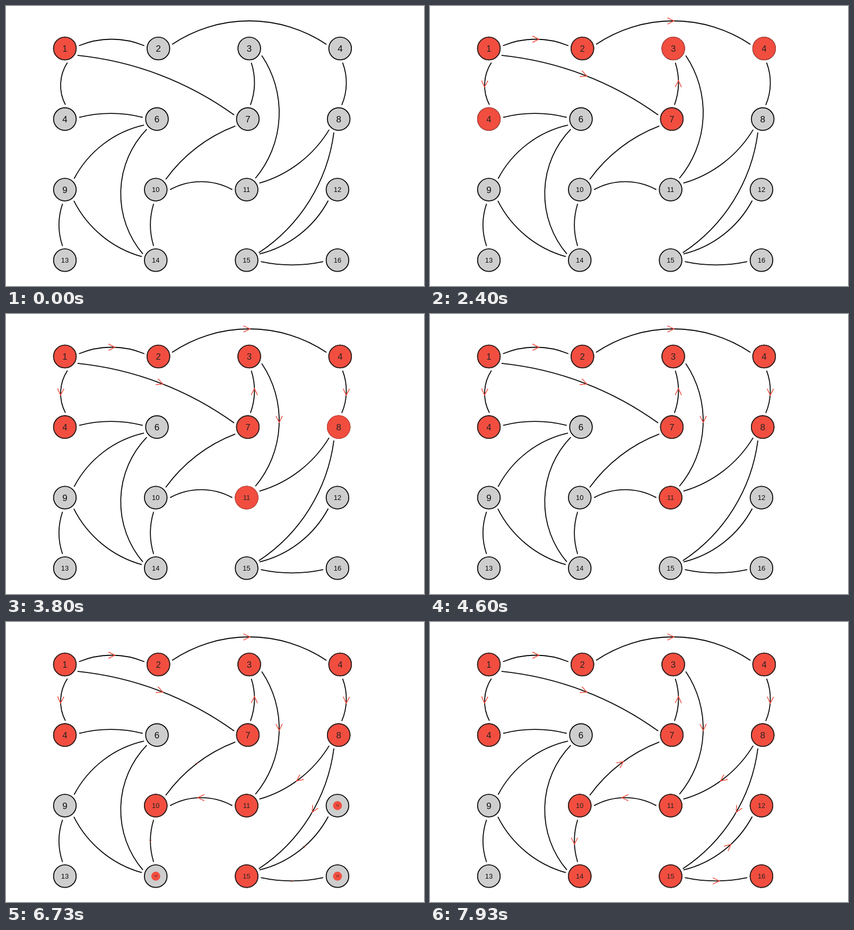
These frames come from a looping animation (788x527 px, 8 s). An HTML page with a canvas:

```html
<!DOCTYPE html>
<html lang="en">
<head>
<meta charset="utf-8">
<title>Graph traversal</title>
<style>
  html, body { margin: 0; width: 100%; height: 100%; overflow: hidden; background: #fff; }
  canvas { display: block; width: 788px; height: 527px; }
</style>
</head>
<body>
<canvas id="stage"></canvas>
<script>
const W = 788, H = 527, LOOP = 8000, LEAD = 65, POP = 1200;
const RED = '#f24e40', GREY = '#cecece', BLACK = '#080808', DARK = '#262222';
const RADIUS = 21.3, GAP = 27, LINE = 1.8;

const canvas = document.getElementById('stage');
const ratio = window.devicePixelRatio || 1;
canvas.width = W * ratio;
canvas.height = H * ratio;
const ctx = canvas.getContext('2d');

// A 4 x 4 grid whose upper rows sit a little to the right
const nodes = Array.from({ length: 16 }, (_, i) => {
  const col = i % 4, row = Math.floor(i / 4);
  const shift = col ? [5, 2.3, 0, 0][row] : 0;
  return {
    label: String(i === 4 ? 4 : i + 1),
    x: 111 + 171.3 * col + shift,
    y: 80 + 132.8 * row,
    start: i ? Infinity : -POP
  };
});

// Each edge: from, to, bulge, then optional turns of both ends (degrees)
// and the arrow's slide along the curve
const waves = [
  { start: 530, edges: [[1, 2, -17.5], [1, 7, -18, 13, -10]] },
  { start: 2000, edges: [[1, 5, 8, -17, 9], [2, 4, -52, 0, 0, -5], [7, 3, 11]] },
  { start: 3470, edges: [[4, 8, -13], [3, 11, -58.5, -38, 13, -16]] },
  { start: 5130, edges: [[8, 11, -20.5], [8, 15, -38, 0, 12, -16], [11, 10, 15, -10, 10]] },
  { start: 6730, edges: [[10, 7, -16], [10, 14, 10], [15, 12, 23, 0, 0, 12], [15, 16, 9]] },
  { start: Infinity, edges: [[5, 6, -10.5], [6, 9, 24], [6, 14, 67, 18, -38], [9, 14, 26, 0, -10], [9, 13, 11]] }
];

function anchor(node, apex, turn) {
  const a = Math.atan2(apex.y - node.y, apex.x - node.x) + turn * Math.PI / 180;
  return { x: node.x + GAP * Math.cos(a), y: node.y + GAP * Math.sin(a) };
}

// Circular arc through a, m and b
function arcThrough(a, m, b) {
  const mx = m.x - a.x, my = m.y - a.y, bx = b.x - a.x, by = b.y - a.y;
  const cross = mx * by - my * bx, m2 = mx * mx + my * my, b2 = bx * bx + by * by;
  const x = a.x + (by * m2 - my * b2) / (2 * cross);
  const y = a.y + (mx * b2 - bx * m2) / (2 * cross);
  const angle = p => Math.atan2(p.y - y, p.x - x);
  return {
    x, y, r: Math.hypot(a.x - x, a.y - y), dir: Math.sign(cross),
    from: angle(a), mid: angle(m), to: angle(b)
  };
}

function makeEdge([from, to, bulge, turnA = 0, turnB = 0, slide = 0], start) {
  const a = nodes[from - 1], b = nodes[to - 1];
  const dx = b.x - a.x, dy = b.y - a.y, k = bulge / Math.hypot(dx, dy);
  const apex = { x: (a.x + b.x) / 2 - dy * k, y: (a.y + b.y) / 2 + dx * k };
  const arc = arcThrough(anchor(a, apex, turnA), apex, anchor(b, apex, turnB));
  b.start = Math.min(b.start, start);
  const at = arc.mid + arc.dir * slide / arc.r;
  const arrow = {
    x: arc.x + arc.r * Math.cos(at),
    y: arc.y + arc.r * Math.sin(at),
    heading: at + arc.dir * Math.PI / 2
  };
  return { arc, arrow, start };
}

const edges = waves.flatMap(w => w.edges.map(e => makeEdge(e, w.start)));

// Damped spring from 0 to 1
function spring(age) {
  const t = age / 1000, damp = 10, freq = 13.6;
  return 1 - Math.exp(-damp * t) * (Math.cos(freq * t) + damp / freq * Math.sin(freq * t));
}

function popIn(item, now, draw) {
  if (now < item.start) return;
  const age = now - item.start + LEAD, scale = spring(age);
  ctx.save();
  ctx.translate(item.x, item.y);
  ctx.scale(scale, scale);
  draw(Math.min(1, age / POP));
  ctx.restore();
}

function disc({ label }, fill, ink, rim) {
  ctx.beginPath();
  ctx.arc(0, 0, RADIUS, 0, Math.PI * 2);
  ctx.lineWidth = LINE;
  ctx.fillStyle = ctx.strokeStyle = fill;
  ctx.fill();
  ctx.stroke();
  ctx.strokeStyle = ctx.fillStyle = ink;
  ctx.globalAlpha = rim;
  ctx.stroke();
  ctx.globalAlpha = 1;
  const size = label.length > 1 ? 13 : 17;
  ctx.font = size + 'px "Liberation Sans", Arial, sans-serif';
  ctx.fillText(label, 0, size * 0.36);
}

function chevron(heading) {
  ctx.rotate(heading);
  ctx.beginPath();
  ctx.moveTo(-6, -6);
  ctx.lineTo(6.3, 0);
  ctx.lineTo(-6, 6);
  ctx.lineWidth = 1.5;
  ctx.strokeStyle = RED;
  ctx.stroke();
}

function render(now) {
  ctx.setTransform(ratio, 0, 0, ratio, 0, 0);
  ctx.fillStyle = '#fff';
  ctx.fillRect(0, 0, W, H);
  ctx.textAlign = 'center';
  ctx.lineWidth = LINE;
  ctx.strokeStyle = BLACK;
  for (const { arc } of edges) {
    ctx.beginPath();
    ctx.arc(arc.x, arc.y, arc.r, arc.from, arc.to, arc.dir < 0);
    ctx.stroke();
  }
  for (const node of nodes) {
    ctx.save();
    ctx.translate(node.x, node.y);
    disc(node, GREY, BLACK, 1);
    ctx.restore();
    // the rim darkens while the disc settles
    popIn(node, now, p => disc(node, RED, DARK, p * p));
  }
  for (const { arrow, start } of edges) {
    popIn({ ...arrow, start }, now, () => chevron(arrow.heading));
  }
}

const begin = performance.now();
function tick() {
  render((performance.now() - begin) % LOOP);
  requestAnimationFrame(tick);
}
tick();
</script>
</body>
</html>
```
